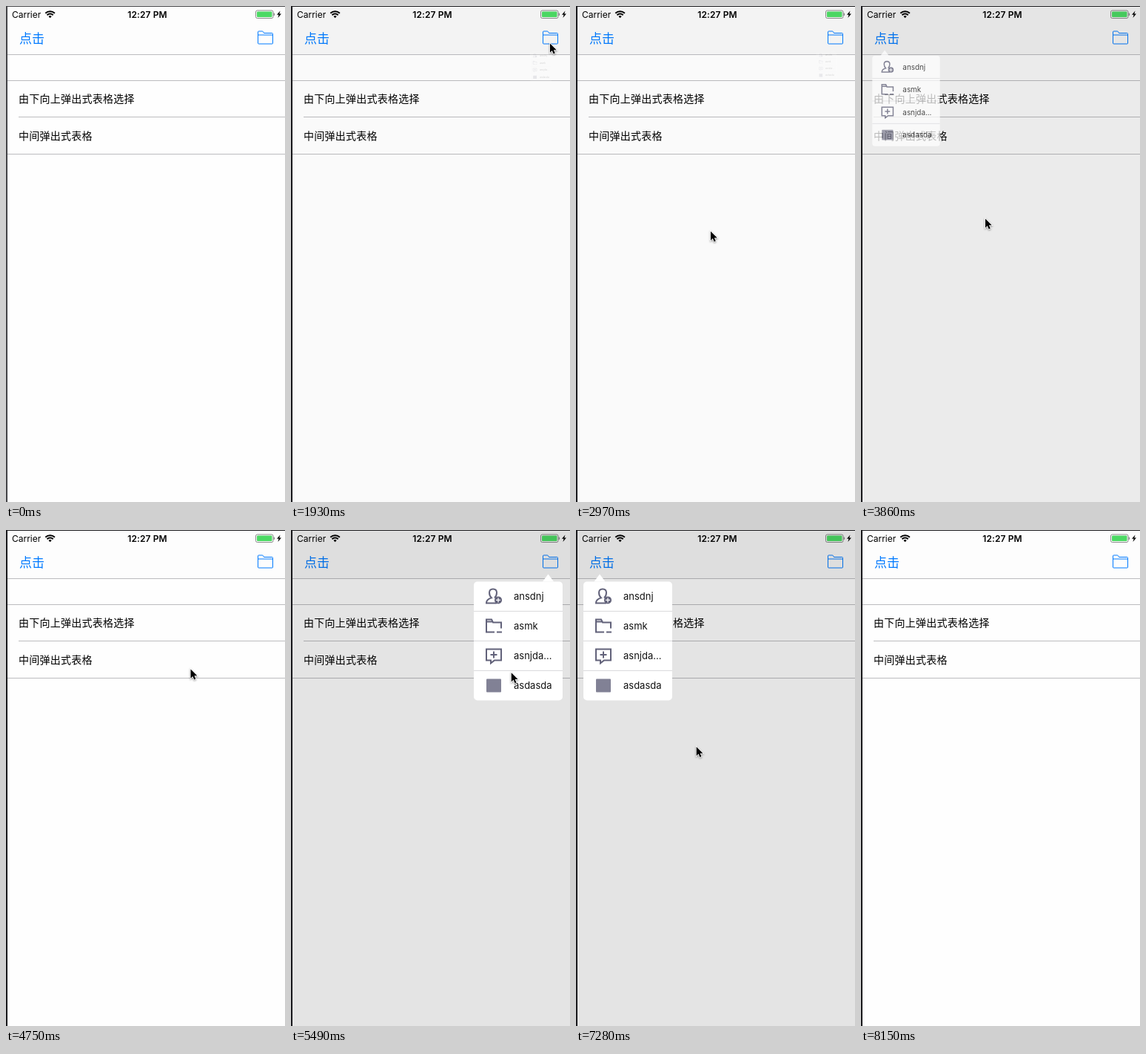
Recreate the animation shown at these times as an HTML page. Size 377x668 px, loop 8300 ms.

```html
<!DOCTYPE html>
<html lang="zh">
<head>
<meta charset="utf-8">
<title>Popup menu</title>
<style>
html, body { margin: 0; width: 100%; height: 100%; overflow: hidden; background: #fefefe; }
svg { display: block; width: 100%; height: 100%; }
text { font-family: Inter, "Noto Sans CJK SC", "Noto Sans CJK", sans-serif; }
.cjk { font-family: "Noto Sans CJK SC", "Noto Sans CJK", sans-serif; }
.status { font-size: 12px; }
.row { font-size: 14px; letter-spacing: .25px; }
.tint { fill: none; stroke: #007aff; }
.rule { fill: #bcbcbf; }
.icon { fill: none; stroke: #62627a; stroke-width: 2; }
.solid { fill: #62627a; stroke: none; }
.label { font-size: 13px; fill: #111; }
</style>
</head>
<body>
<svg viewBox="0 0 377 668">
  <rect width="377" height="668" fill="#fefefe"/>
  <rect id="nav" width="377" height="65"/>

  <text class="status" x="8" y="15.6">Carrier</text>
  <g fill="none" stroke="#000" stroke-width="2">
    <path d="M53.3 9.7a9 9 0 0 1 12.6 0M55.5 12.2a5.8 5.8 0 0 1 8.2 0"/>
    <path d="M59.6 16.2l-2.1-2.2a3 3 0 0 1 4.2 0Z" fill="#000" stroke="none"/>
  </g>
  <text class="status" x="191" y="15.6" text-anchor="middle" font-weight="600" letter-spacing=".1">12:27 PM</text>
  <rect x="337.5" y="6" width="23.5" height="10.5" rx="2" fill="none" stroke="#8a8a8a"/>
  <rect x="339" y="7.5" width="20.5" height="7.5" rx="1" fill="#4cd964"/>
  <path d="M362 9.5q1.6 1.7 0 3.5Z" fill="#777" stroke="#777" stroke-width=".6"/>
  <path d="M370.5 6.5l-4.5 5.3h2.6l-1.2 4.2 4.6-5.4h-2.7Z"/>

  <text class="cjk" x="18" y="49.5" font-size="17" fill="#007aff">点击</text>
  <path class="tint" d="M340.5 50V35q0-1 1-1H346.3q.9 0 1.3.8l.9 1.7H359.5q1 0 1 1V50q0 1-1 1H341.5q-1 0-1-1ZM340.5 39H360.5"/>

  <rect class="rule" y="65" width="377" height="1"/>
  <rect class="rule" y="100" width="377" height="1"/>
  <rect class="rule" x="17" y="149" width="360" height="1"/>
  <rect class="rule" y="199" width="377" height="1"/>
  <text class="cjk row" x="17" y="130">由下向上弹出式表格选择</text>
  <text class="cjk row" x="17" y="180">中间弹出式表格</text>

  <rect id="dim" width="377" height="668"/>
  <path id="edge" d="M0 0H377V1H2V668H0Z"/>

  <g id="menu">
    <path d="M0 0L7.5 10H-7.5Z" fill="#fff"/>
    <g id="panel">
      <rect width="120" height="160" rx="5" fill="#fff"/>
      <path d="M0 40H120M0 80H120M0 120H120" stroke="#d8d8da"/>
      <g class="icon">
        <path d="M31 29H17q0-5 7-7-3-3-3-7 0-5 5-5t5 5q0 4-3 7"/>
        <circle class="solid" cx="33" cy="25" r="5"/>
        <path d="M33 22v6M30 25h6" stroke="#fff" stroke-width="1.3"/>
        <path d="M37 63V55H26l-2-4H17V68H28M17 54H25M31 68H38"/>
        <path d="M17 91H37V106H28l-5 4V106H17ZM27 94v9M22.5 98.5h9"/>
        <rect class="solid" x="17" y="131" width="20" height="18" rx="1" opacity=".8"/>
      </g>
      <g class="label">
        <text x="54" y="24.6">ansdnj</text>
        <text x="54" y="64.6">asmk</text>
        <text x="54" y="104.6">asnjda...</text>
        <text x="54" y="144.6">asdasda</text>
      </g>
    </g>
  </g>

  <path id="cursor" d="M1 1.5V13.7L3.8 11 5.7 15.5 7.8 14.6 5.9 10.2H9.8Z" stroke="#fff" stroke-width="1.6" paint-order="stroke" style="filter:drop-shadow(0 1px 1px #0006)"/>
</svg>
<script>
const LOOP = 8300, STEPS = 56, TICK = 148.4;
const FADE = 250;   // popup opening and closing
const LEAD = 240;   // pointer waits this long before each tap
const $ = id => document.getElementById(id);
const set = (id, attrs) => {
  for (const key in attrs) $(id).setAttribute(key, attrs[key]);
};
const at = (x, y) => ({ x, y });

const left = { tip: 32, offset: 22, button: at(26, 54) };
const right = { tip: 347.5, offset: 100.5, button: at(349, 49) };
const popups = [
  { side: right, open: 1866, close: 2777, blank: at(181, 302) },
  { side: left, open: 3420, close: 3774, blank: at(167, 285), next: at(199, 371) },
  { side: right, open: 5210, close: 5890, blank: at(188, 298) },
  { side: left, open: 6614, close: 7560, blank: at(185, 310), next: at(377, 668) }
];

// The pointer taps a button, then an empty spot, then may wander on.
const stops = [{ arrive: 740, leave: 740, place: at(146, 193) }];
for (const { side, open, close, blank, next } of popups) {
  stops.push({ arrive: open - LEAD, leave: open + 70, place: side.button });
  stops.push({ arrive: close - LEAD, leave: close + 200, place: blank });
  if (next) stops.push({ arrive: close + 526, leave: close + 676, place: next });
}

const clamp = x => Math.min(1, Math.max(0, x));
const smooth = x => clamp(x) ** 2 * (3 - 2 * clamp(x));

function pointer(time) {
  const i = stops.findLastIndex(stop => stop.arrive <= time);
  if (i < 0) return null;
  const { leave, place } = stops[i];
  const { arrive, place: goal } = stops[i + 1] || stops[i];
  const k = time > leave ? clamp((time - leave) / (arrive - leave)) : 0;
  // Sideways motion lags, which bends the path.
  return at(place.x + (goal.x - place.x) * k * k, place.y + (goal.y - place.y) * k);
}

function draw(time) {
  const popup = popups.find(p => time > p.open && time < p.close + FADE);
  const shown = popup
    ? smooth((time - popup.open) / FADE) - smooth((time - popup.close) / FADE)
    : 0;

  set('nav', { fill: shown ? '#f7f7f7' : '#fdfdfd' });
  set('dim', { opacity: 0.1 * shown });
  set('edge', { fill: time < popups[0].open ? '#47474a' : '#1c1c1f' });
  set('menu', { opacity: shown });
  if (popup) {
    const { tip, offset } = popup.side;
    set('menu', { transform: `translate(${tip} 59.4) scale(${0.1 + 0.9 * shown})` });
    set('panel', { transform: `translate(${-offset} 10)` });
  }

  const spot = pointer(time);
  set('cursor', { visibility: spot ? 'visible' : 'hidden' });
  if (spot) set('cursor', { transform: `translate(${spot.x} ${spot.y})` });
}

const start = performance.now();
function frame() {
  const phase = ((performance.now() - start) % LOOP) / LOOP;
  draw(Math.floor(phase * STEPS + 0.02) % STEPS * TICK);
  requestAnimationFrame(frame);
}
frame();
</script>
</body>
</html>
```
